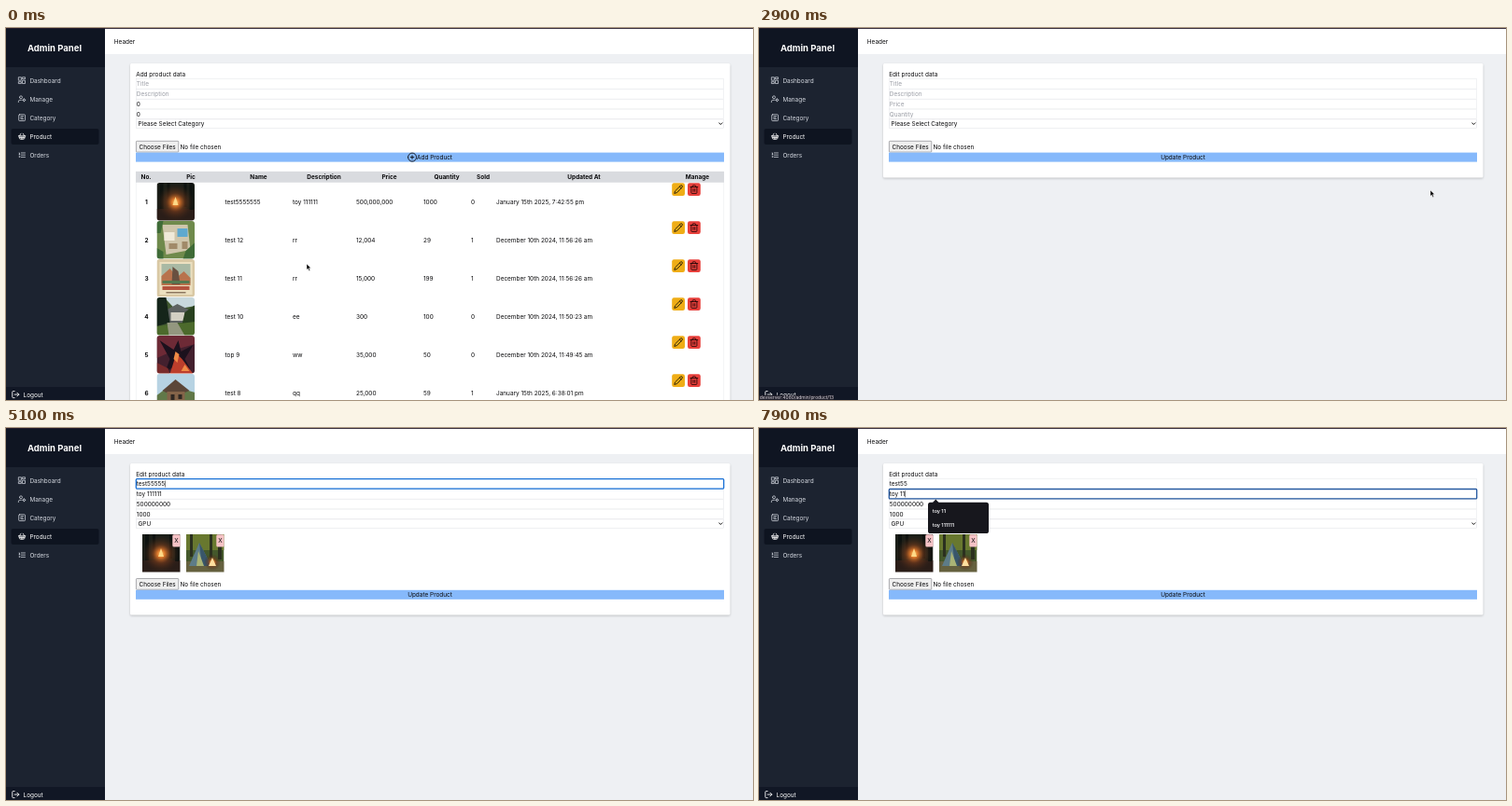
Write an HTML page that moves like this. It is 800 px wide and 399 px high and loops after 8000 ms.

```html
<!DOCTYPE html>
<html lang="en">
<head>
<meta charset="utf-8">
<title>Admin Panel</title>
<style>
  html, body { margin: 0; width: 100%; height: 100%; overflow: hidden; background: #eef0f3; }
  svg { display: block; width: 100%; height: 100%; }
  text { font: 6.45px Inter, "Liberation Sans", sans-serif; fill: #0a0a0c; white-space: pre; }
  .bold { font-weight: 700; }
  .mid { text-anchor: middle; }
  .hint { fill: #9a9da5; }
  .nav { fill: #d5d9e0; }
  .white { fill: #fff; }
  .title { font-size: 9.5px; font-weight: 700; fill: #fff; }
  .small { font-size: 4.9px; fill: #d9d3dc; }
  .popup { font-size: 5.4px; font-weight: 600; fill: #f1f1f4; }
  .icon { fill: none; stroke-linecap: round; stroke-linejoin: round; }
  .card { filter: drop-shadow(0 1px 1.2px #0003); }
</style>
</head>
<body>
<svg viewBox="0 0 800 399" preserveAspectRatio="none">
  <defs>
    <clipPath id="round"><rect width="40.5" height="40.5" rx="3"/></clipPath>
    <clipPath id="square"><rect width="40.5" height="40.5"/></clipPath>
    <filter id="soft" x="0" y="0" width="1" height="1"><feGaussianBlur stdDeviation=".5"/></filter>
    <radialGradient id="glow">
      <stop offset="0" stop-color="#ffcf70"/><stop offset=".2" stop-color="#d9752a"/>
      <stop offset=".5" stop-color="#7a3d1c" stop-opacity=".6"/><stop offset="1" stop-color="#3a2418" stop-opacity="0"/>
    </radialGradient>
  </defs>
  <g id="scene"></g>
  <g id="cursor"></g>
</svg>
<script>
const LOOP = 8000;
const el = id => document.getElementById(id);
const pen = document.createElement('canvas').getContext('2d');

const rect = (x, y, w, h, fill, more = '') =>
  `<rect x="${x}" y="${y}" width="${w}" height="${h}" fill="${fill}" ${more}/>`;
// y is the vertical middle of the line
const text = (x, y, s, cls = '', drop = 2.35) => `<text x="${x}" y="${y + drop}" class="${cls}">${s}</text>`;
const icon = (d, x, y, size, color, width = 2) =>
  `<path class="icon" d="${d}" transform="translate(${x} ${y}) scale(${size / 24})" stroke="${color}" stroke-width="${width}"/>`;

const ICONS = {
  Dashboard: 'M3 3h7v9H3zM14 3h7v5h-7zM14 12h7v9h-7zM3 16h7v5H3z',
  Manage: 'M5 7a4 4 0 1 0 8 0a4 4 0 1 0-8 0M10 15H6a4 4 0 0 0-4 4v2M15 15a3 3 0 1 0 6 0a3 3 0 1 0-6 0M18 11v1M18 18v1M14 15h1M21 15h1',
  Category: 'M5 3h14a2 2 0 0 1 2 2v14a2 2 0 0 1-2 2H5a2 2 0 0 1-2-2V5a2 2 0 0 1 2-2zM9 8h7M8 12h6M9 16h7',
  Product: 'M15 11l-1 9M19 11l-4-7M2 11h20M3.5 11l1.6 7.4a2 2 0 0 0 2 1.6h9.8a2 2 0 0 0 2-1.6l1.7-7.4M4.5 15.5h15M5 11l4-7M9 11l1 9',
  Orders: 'M10 6h11M10 12h11M10 18h11M4 10h2M4 6h1v4M6 18H4c0-1 2-2 2-3s-1-1.5-2-1'
};
const EXIT = 'M9 21H5a2 2 0 0 1-2-2V5a2 2 0 0 1 2-2h4M16 17l5-5-5-5M21 12H9';
const PLUS = 'M2 12a10 10 0 1 0 20 0a10 10 0 1 0-20 0M8 12h8M12 8v8';
const PENCIL = 'M21.2 6.8a2.8 2.8 0 0 0-4-4L3.8 16.2l-1.8 5.8 5.8-1.8zM15 5l4 4';
const TRASH = 'M3 6h18M19 6v14a2 2 0 0 1-2 2H7a2 2 0 0 1-2-2V6M8 6V4a2 2 0 0 1 2-2h4a2 2 0 0 1 2 2v2M10 11v6M14 11v6';

// Each picture: background, then path / fill pairs on a 40 unit square
const PICS = {
  fire: ['#1b1e18', 'M0 28h41v13H0z', '#2a1d18', 'M3 0h4v28H3zM11 0h3v25h-3zM29 0h3v26h-3zM35 0h4v29h-4z', '#0d120f',
    'M0 21a20 20 0 1 0 40 0a20 20 0 1 0-40 0', 'url(#glow)', 'M20 15l3 9h-6z', '#ffd987'],
  villa: ['#6f8a4c', 'M6 4h27l3 27-26 5z', '#cfc6ac', 'M22 8h11v9H22z', '#5fa9cf', 'M8 12h11v9H8z', '#f0ead9',
    'M13 24h9v6h-9zM27 22h6v8h-6z', '#a18a69', 'M0 0h7l-3 13H0zM31 32l10-9v18H28zM0 29l7 4v8H0z', '#3f6b37'],
  poster: ['#d9c8a4', 'M3 3h35v35H3z', '#ece0c0', 'M5 5h31v21H5z', '#a9b9a4', 'M5 18l9-8 8 9 7-6 7 7v8H5z', '#b8734d',
    'M17 8l6 5 2 14h-9z', '#695040', 'M6 23h29v3H6z', '#55794f', 'M6 29h29v4H6z', '#b4533e', 'M10 35h21v1.5H10z', '#8d7760'],
  house: ['#40582f', 'M8 0h33v9L20 13z', '#c8d8dd', 'M11 13l11-6 14 7v13H11z', '#5d6261', 'M15 16h15v9H15z', '#d3d0c3',
    'M0 0h10l4 27-14 4z', '#15251a', 'M30 16l11-8v21H27z', '#28401f', 'M0 31l41-5v15H0z', '#4c6a2c', 'M11 27h11l8 14H13z', '#93977f'],
  ember: ['#43202e', 'M0 0h41v9L23 14 0 24z', '#6d2a36', 'M3 5l15 10 5-10 3 12 13-7-9 15 6 11-14-5-13 8 5-14z', '#1b111d',
    'M14 41l7-22 6 6 12 16z', '#bc3e2c', 'M20 17l4 3-2 9-4-4zM30 31l5 7h-9z', '#f08a46', 'M0 29l12 6 2 6H0z', '#792b2c'],
  hut: ['#b7d3e3', 'M0 23l8-6 9 6 10-7 14 4v21H0z', '#617848', 'M6 18L20 6l15 12-5 2H10z', '#5b4638', 'M11 19h19v11H11z', '#846449',
    'M15 22h4v8h-4zM23 22h4v5h-4z', '#2f2823', 'M0 30h41v11H0z', '#a69a70'],
  tent: ['#44582b', 'M0 0h41v17H0z', '#68782f', 'M4 0h3v24H4zM25 0h3v25h-3zM34 0h4v27h-4z', '#2b301f', 'M0 29h41v12H0z', '#65613f',
    'M3 34L14 9l13 25z', '#5d7c88', 'M14 9l3 25h10z', '#39566a', 'M13 18l6 16h-8z', '#aab476',
    'M19 30a9 9 0 1 0 18 0a9 9 0 1 0-18 0', 'url(#glow)', 'M28 25l4 9h-8z', '#ffe0a0']
};
function picture(name, x, y, clip) {
  const [back, ...parts] = PICS[name];
  let s = rect(0, 0, 40.5, 40.5, back);
  for (let i = 0; i < parts.length; i += 2) s += `<path d="${parts[i]}" fill="${parts[i + 1]}"/>`;
  return `<g transform="translate(${x} ${y})" clip-path="url(#${clip})"><g filter="url(#soft)">${s}</g></g>`;
}

const ROWS = [
  ['fire', 'test5555555', 'toy 111111', '500,000,000', 1000, 0, 'January 15th 2025, 7:42:55 pm'],
  ['villa', 'test 12', 'rr', '12,004', 29, 1, 'December 10th 2024, 11:56:26 am'],
  ['poster', 'test 11', 'rr', '15,000', 199, 1, 'December 10th 2024, 11:56:26 am'],
  ['house', 'test 10', 'ee', '300', 100, 0, 'December 10th 2024, 11:50:23 am'],
  ['ember', 'top 9', 'ww', '35,000', 50, 0, 'December 10th 2024, 11:49:45 am'],
  ['hut', 'test 8', 'qq', '25,000', 59, 1, 'January 15th 2025, 6:38:01 pm']
];
const COLUMNS = [234.5, 307, 375, 447, 498, 525];
const HEADS = { 'No.': 150, Pic: 198, Name: 270.5, Description: 340.5, Price: 410.5, Quantity: 472, Sold: 511, 'Updated At': 619, Manage: 740.5 };

function frame() {
  let s = rect(0, 0, 800, 399, '#eef0f3') + rect(106, 0, 694, 28, '#fff') + text(115.8, 14.5, 'Header')
    + rect(0, 0, 106, 399, '#1c2330') + rect(0, 0, 106, 42, '#0f1522') + rect(0, 385, 106, 14, '#111725')
    + text(52, 21, 'Admin Panel', 'title mid', 3.5)
    + rect(5.5, 108, 94, 17, '#0e1420', 'rx="2"');
  Object.keys(ICONS).forEach((name, i) => {
    const y = 56.3 + 20 * i, active = name === 'Product';
    s += icon(ICONS[name], 12.6, y - 4.6, 9, active ? '#fff' : '#d5d9e0') + text(25.4, y, name, active ? 'white' : 'nav');
  });
  return s + icon(EXIT, 5.6, 388.4, 9.4, '#fff', 2.2) + text(18.5, 393.2, 'Logout', 'white')
    + rect(0, 0, 800, .9, '#251b2b');
}

// fields: [text, isHint] for the four inputs; shift moves the part below the pictures
function form(heading, fields, category, button, bottom, shift) {
  let s = rect(133, 38, 642.5, bottom - 38, '#fff', 'class="card" rx="1.5"') + text(139.2, 49.5, heading);
  fields.forEach(([value, hint], i) => {
    const y = 54.7 + 10.8 * i;
    s += rect(139.3, y, 629.4, 10.6, '#fff', 'stroke="#e3e5e9" stroke-width=".5"')
      + text(139.8, y + 5.4, value, hint ? 'hint' : '');
  });
  const y = 127.3 + shift;
  return s + rect(139.3, 97.9, 629.4, 9.3, '#fff', 'stroke="#dcdee3" stroke-width=".5"')
    + text(141.5, 102.6, category)
    + '<path class="icon" d="M763.6 101.8l1.7 1.7 1.7-1.7" stroke="#111" stroke-width="1"/>'
    + rect(139.4, y - 6, 45.4, 11.8, '#efefef', 'rx=".8" stroke="#77777c" stroke-width=".6"')
    + text(162.1, y, 'Choose Files', 'mid') + text(186.4, y, 'No file chosen')
    + rect(139, y + 6.3, 630, 10, '#86b9fb')
    + text(button === 'Add Product' ? 459 : 454, y + 11.4, button, 'mid');
}

function listPage() {
  let s = form('Add product data', [['Title', 1], ['Description', 1], ['0'], ['0']], 'Please Select Category', 'Add Product', 420, 0)
    + icon(PLUS, 429.6, 133.2, 10.8, '#0a0a0c', 2)
    + rect(139.2, 154, 629.6, 260, '#fff', 'stroke="#e6e8eb" stroke-width=".5"')
    + rect(139, 154, 630, 11.7, '#d9dbdf');
  for (const name in HEADS) s += text(HEADS[name], 160, name, 'bold mid');
  ROWS.forEach(([pic, ...cells], i) => {
    const top = 166 + 41 * i;
    s += text(150.5, top + 20.3, i + 1, 'bold mid') + picture(pic, 161.5, top, 'round')
      + cells.map((c, k) => text(COLUMNS[k], top + 20.3, c)).join('')
      + rect(713.2, top + .2, 13.8, 13.8, '#efad16', 'rx="2.2"') + icon(PENCIL, 714.9, top + 1.9, 10.4, '#191307')
      + rect(730, top + .2, 13.8, 13.8, '#e8403c', 'rx="2.2"') + icon(TRASH, 731.7, top + 1.9, 10.4, '#250606');
  });
  return s;
}

function popup(items) {
  const bottom = 83 + 15 * items.length;
  return `<path d="M186 80l3.3-3.4 3.3 3.4z" fill="#17171d"/>`
    + rect(181, 79.8, 65, bottom - 79.8, '#17171d', 'rx="2.6"')
    + items.map((s, i) => text(185.8, 89.5 + 15 * i, s, 'popup', 1.9)).join('');
}

const FOCUS = [4300, 6700];   // title, description
const keys = (t, start, step, max) => t < start ? 0 : Math.min(max, 1 + Math.floor((t - start) / step));

function editPage(t) {
  if (t < 3200)
    return form('Edit product data', ['Title', 'Description', 'Price', 'Quantity'].map(s => [s, 1]),
      'Please Select Category', 'Update Product', 160.5, 0);
  const cuts = [keys(t, 4800, 300, 5), keys(t, 7000, 220, 4)];
  const title = 'test5555555'.slice(0, 11 - cuts[0]);
  const toy = 'toy 111111'.slice(0, 10 - cuts[1]);
  let s = form('Edit product data', [[title], [toy], ['500000000'], ['1000']], 'GPU', 'Update Product', 200.5, 40.2);
  ['fire', 'tent'].forEach((pic, i) => {
    const x = 146 + 47 * i;
    s += picture(pic, x, 114, 'square') + rect(x + 32.3, 114.2, 8.2, 13.4, '#f6c3c6', 'rx="1.5"')
      + text(x + 36.4, 121, 'X', 'mid');
  });
  if (t >= FOCUS[0]) {
    const k = t < FOCUS[1] ? 0 : 1, y = 54.7 + 10.8 * k;
    s += rect(139.3, y, 629.4, 10.4, 'none', `rx="1" stroke="${k ? '#2458a0' : '#176fd6'}" stroke-width="1.3"`);
    const last = cuts[k] ? (k ? 7000 + 220 * (cuts[k] - 1) : 4800 + 300 * (cuts[k] - 1)) : FOCUS[k];
    pen.font = '64.5px Inter, "Liberation Sans", sans-serif';
    const end = 140 + pen.measureText(k ? toy : title).width / 10;
    if ((t - last) % 1000 < 500) s += rect(end, y + 1.8, .5, 7, '#000');
  }
  if (cuts[1]) s += popup(cuts[1] < 4 ? ['toy 111111'] : ['toy 11', 'toy 111111']);
  return s;
}

const status = () => rect(0, 393.8, 80, 5.2, '#20202b') + text(.8, 396.8, 'devserver:4080/admin/product/13', 'small', 1.3);

// time, x, y of the pointer
const PATH = [[0, 322, 253], [250, 322, 253], [1000, 379, 194], [1250, 379, 194], [2100, 666, 192], [2450, 719, 174],
  [3200, 719, 174], [3950, 233, 63], [6200, 233, 63], [6400, 208, 75], [6650, 203, 72], [8000, 203, 72]];
const ARROW = '<path d="M0 0V6.3L1.5 5l1.1 2.4 1.1-.5-1.1-2.3h2z" fill="#000" stroke="#fff" stroke-width=".45"/>';
const BEAM = '<path class="icon" d="M-1.3-3Q0-3 0-2.2Q0-3 1.3-3M0-2.2V2.4M-1.3 3.2Q0 3.2 0 2.4Q0 3.2 1.3 3.2" stroke="#111" stroke-width=".7"/>';

function pointer(t) {
  if (t >= 4800 && t < 6200 || t >= 7000) return '';
  const i = PATH.findIndex(p => p[0] > t);
  const [t0, x0, y0] = PATH[i - 1], [t1, x1, y1] = PATH[i];
  const u = (t - t0) / (t1 - t0), e = u * u * (3 - 2 * u);
  const x = x0 + (x1 - x0) * e, y = y0 + (y1 - y0) * e;
  const overInput = t > 2800 && y > 54 && y < 98 && x > 139 && x < 769;
  return `<g transform="translate(${x.toFixed(2)} ${y.toFixed(2)})">${overInput ? BEAM : ARROW}</g>`;
}

const FRAME = frame(), LIST = listPage();
let shown = '';
function draw(now) {
  const t = now % LOOP;
  const scene = FRAME + (t < 2800 ? LIST : editPage(t)) + (t >= 2400 && t < 3650 ? status() : '');
  if (scene !== shown) el('scene').innerHTML = shown = scene;
  el('cursor').innerHTML = pointer(t);
}
const start = performance.now();
(function tick() {
  draw(performance.now() - start);
  requestAnimationFrame(tick);
})();
</script>
</body>
</html>
```
